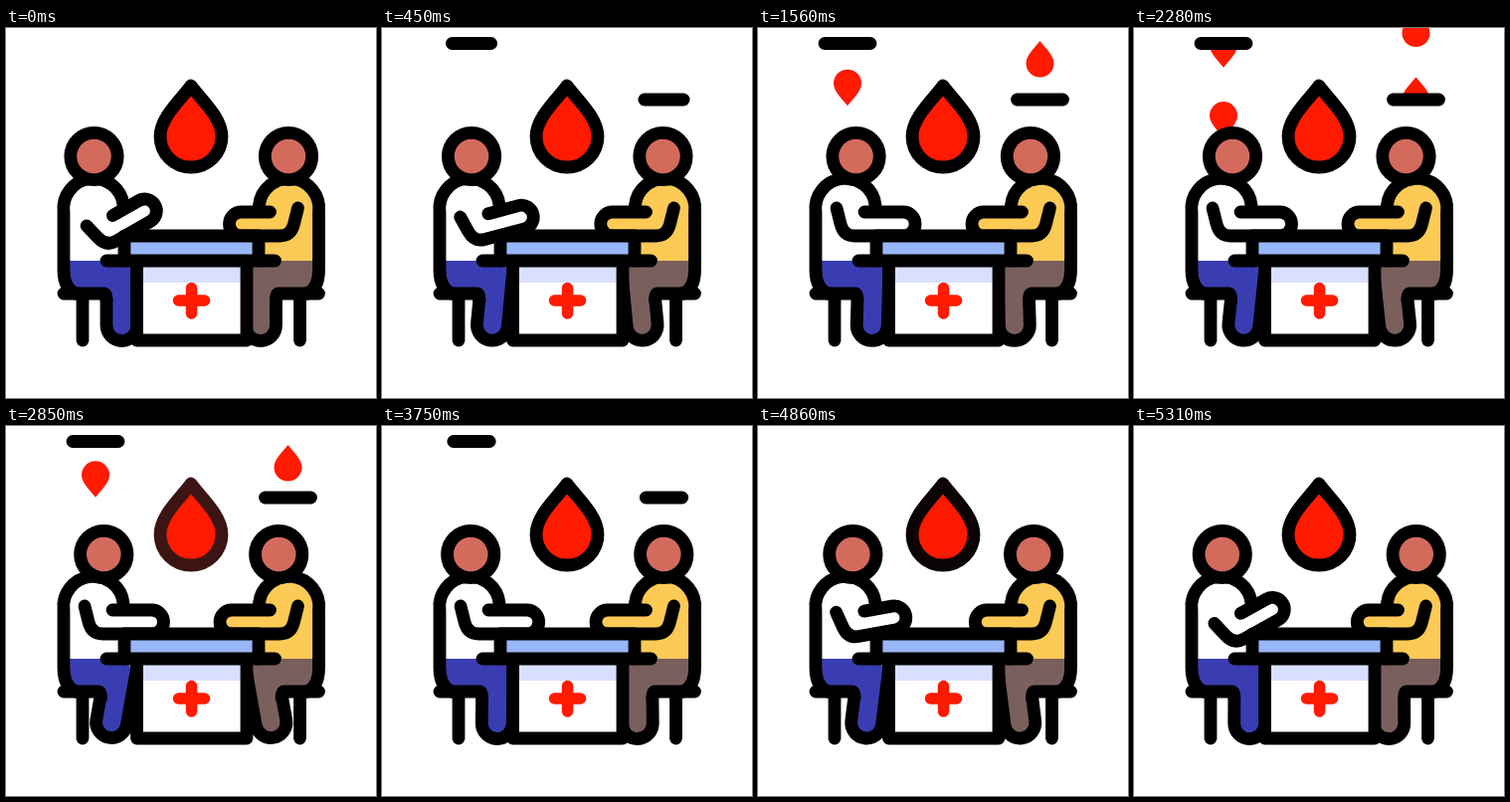
An HTML page with a canvas for the animation above (5400 ms loop, 372 px wide and 372 px high).

```html
<!DOCTYPE html>
<html lang="en">
<head>
<meta charset="utf-8">
<title>Blood donation</title>
<style>
html, body { margin: 0; width: 100%; height: 100%; overflow: hidden; background: #fff; }
canvas { display: block; width: 372px; height: 372px; }
</style>
</head>
<body>
<canvas id="stage" width="372" height="372"></canvas>
<script>
const ctx = document.getElementById('stage').getContext('2d');
const LOOP = 5400, BEAT = 900, SIZE = 372, RED = '#ff1a00';

const clamp = u => Math.min(1, Math.max(0, u));
const ease = u => (1 - Math.cos(Math.PI * clamp(u))) / 2;
const ramp = (t, start, length = BEAT) => ease((t - start) / length);
const wave = t => (1 - Math.cos(Math.PI * t / BEAT)) / 2;
const bump = (t, mid) => ease((BEAT / 2 - Math.abs(t - mid)) / 300);

function shape(d, fill, stroke) {
  const p = new Path2D(d);
  if (fill) { ctx.fillStyle = fill; ctx.fill(p); }
  if (stroke) { ctx.strokeStyle = stroke; ctx.stroke(p); }
}
const line = (d, color = '#000') => shape(d, null, color);

function box(x, y, w, h, color) {
  ctx.fillStyle = color;
  ctx.fillRect(x, y, w, h);
}

function inside(draw) {
  ctx.save();
  draw();
  ctx.restore();
}

function turn(x, y, angle) {
  ctx.translate(x, y);
  ctx.rotate(angle);
  ctx.translate(-x, -y);
}

// Teardrop with its tip at (x, y), round end r wide and h further down
function teardrop(x, y, r, h, fill, stroke) {
  const w = r * 0.3;
  shape(`M${x} ${y}C${x - w} ${y + h * 0.26} ${x - r} ${y + h * 0.62} ${x - r} ${y + h}` +
    `A${r} ${r} 0 0 0 ${x + r} ${y + h}` +
    `C${x + r} ${y + h * 0.62} ${x + w} ${y + h * 0.26} ${x} ${y}Z`, fill, stroke);
}

// One droplet leaving its bar; dir 1 falls, -1 rises
function droplet(t, start, x, y, dir, travel) {
  const u = (t - start) / (3 * BEAT);
  if (u <= 0 || u >= 1 || t >= 4 * BEAT) return;
  inside(() => {
    ctx.globalAlpha = clamp((4 * BEAT - t) / 150);
    ctx.beginPath();
    ctx.rect(x - 30, dir > 0 ? y : y - 200, 60, 200);
    ctx.clip();
    ctx.translate(x, y + dir * travel * ease(u));
    ctx.scale(1, -dir);
    teardrop(0, 0, 14, 22.5, RED);
  });
}

function emitter(t, x, y, dir, travel) {
  for (const start of [0, 1400]) droplet(t, start, x, y, dir, travel);
  const half = 23 * ease(t / 600) * clamp(1 - (t - 4 * BEAT) / 720);
  if (half > 0.3) line(`M${x - half} ${y}H${x + half}`);
}

function person(t, look) {
  const lean = t < 3 * BEAT ? ramp(t, 0, 2 * BEAT) : wave(t);
  const swing = wave(t);
  const knee = 101 - 6 * swing;

  // Torso, thigh and chair
  line('M77 267V314');
  shape('M58 235V185A30 30 0 0 1 118 185V235Z', look.top);
  shape('M58 234H124V267H72Q58 262 58 243Z', look.legs);

  // Lower leg
  inside(() => {
    turn(117, 240, swing * 0.19);
    shape('M132 240V299A15.5 15.5 0 0 1 101 299V240Z', look.legs);
    line('M132 240V299A15.5 15.5 0 0 1 101 299V274');
  });
  line('M118 178A30 30 0 0 0 58 185V243Q58 262 70 267');
  line(`M58 267H${knee - 3}Q${knee} 267 ${knee} 274`);

  // Head
  ctx.beginPath();
  ctx.arc(88.5 + 10.5 * lean, 129, 23.7, 0, 7);
  ctx.fillStyle = '#d36b5d';
  ctx.fill();
  ctx.stroke();

  // Arm
  inside(() => {
    const hand = look.hand(t), lift = look.lift(t);
    ctx.translate(lift, -2 * lift);
    turn(117, 189, -0.52 * lift);
    shape(`M79 181L83 197Q86 209 97 209H${hand}A12 12 0 0 0 ${hand} 185H107`, look.top, '#000');
  });
}

const donor = {
  top: '#fff', legs: '#3a3db1',
  hand: t => 137 + 9.5 * ramp(t, 0, 2 * BEAT) - 12 * ramp(t, 4 * BEAT) + 2.5 * ramp(t, 5 * BEAT),
  lift: t => 1 - ramp(t, 0) + ramp(t, 5 * BEAT)
};
const nurse = {
  top: '#fdca55', legs: '#7a605d',
  hand: t => 136 + 9.5 * (ramp(t, 0) - ramp(t, 5 * BEAT)),
  lift: () => 0
};

function desk(red) {
  box(132, 234, 110, 80, '#fff');
  box(132, 234, 110, 22, '#d9dfff');
  line('M131.5 238V314H242V238');
  box(119, 209, 135, 25, '#98b6fa');
  line('M119 234V209H254V234');
  line('M101 234H270.5');
  inside(() => {
    ctx.lineWidth = 11.5;
    line('M173.5 274H199.5M186.5 261.5V287', red);
  });
}

function draw(t) {
  ctx.lineWidth = 12.8;
  ctx.lineCap = ctx.lineJoin = 'round';
  box(0, 0, SIZE, SIZE, '#fff');

  emitter(t, 90, 15.5, 1, 101);
  emitter(t, 283.5, 72, -1, 95);
  person(t, donor);
  inside(() => {
    ctx.translate(SIZE + 0.5, 0);
    ctx.scale(-1, 1);
    person(t, nurse);
  });

  const dim = bump(t, 5 * BEAT), glow = dim + bump(t, 3 * BEAT);
  const red = `rgb(${255 - 20 * dim},${26 - 3 * dim},0)`;
  desk(red);
  teardrop(186, 58, 31, 51, red, `rgb(${60 * glow},${20 * glow},${20 * glow})`);
}

const began = performance.now();
function frame() {
  const t = (performance.now() - began) % LOOP;
  draw(Math.floor(t / 30) * 30);
  requestAnimationFrame(frame);
}
frame();
</script>
</body>
</html>
```
